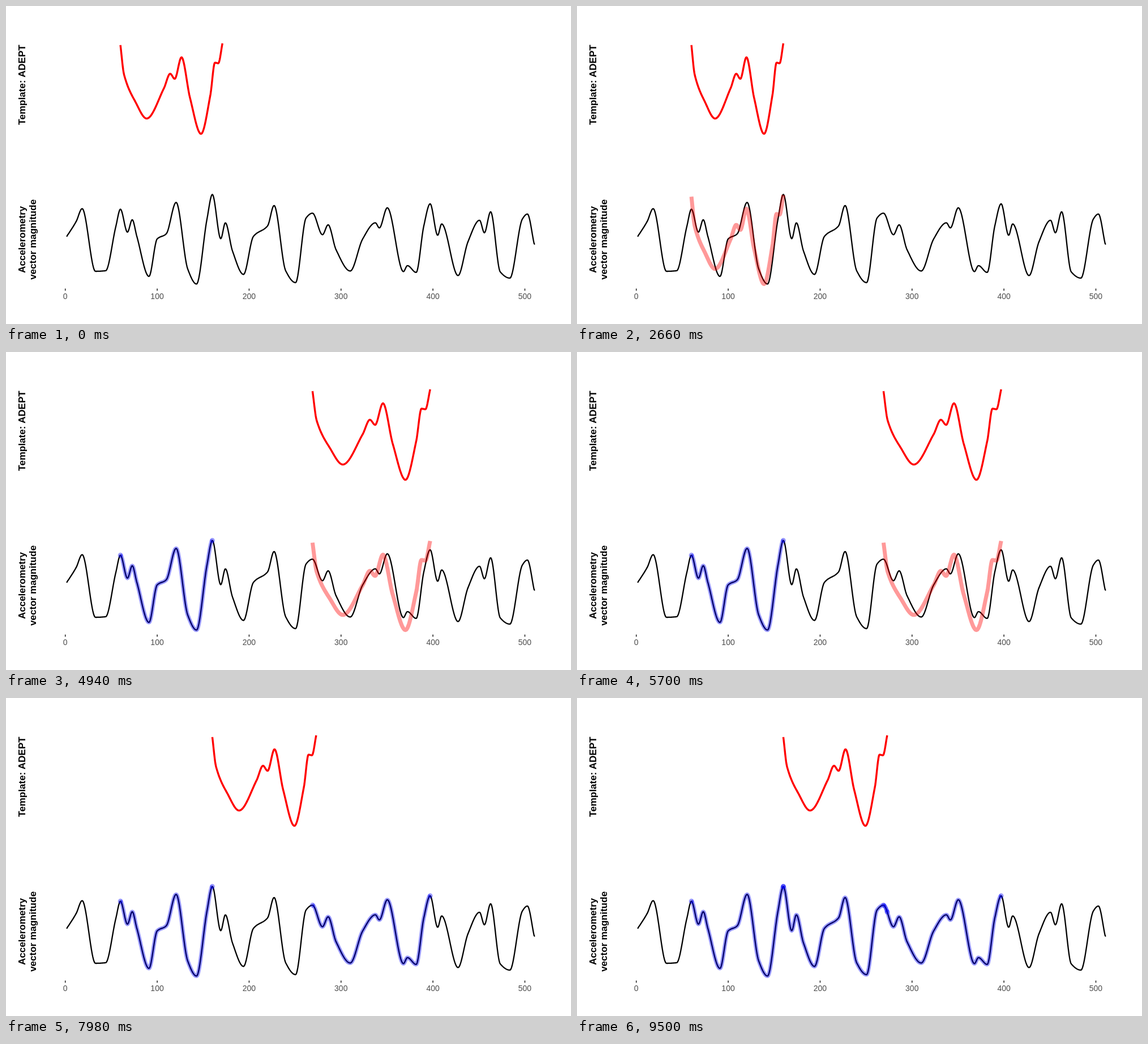
An HTML page with a canvas that plays this animation: 998 px wide and 561 px high, repeating every 9.88 s.

```html
<!DOCTYPE html>
<html lang="en">
<head>
<meta charset="utf-8">
<title>Template matching</title>
<style>
  html, body { margin: 0; width: 100%; height: 100%; overflow: hidden; background: #fff; }
  canvas { display: block; }
</style>
</head>
<body>
<canvas id="stage" width="998" height="561"></canvas>
<script>
const ctx = document.getElementById('stage').getContext('2d');
const STEP_MS = 380, STEPS = 26;
const BASE_LENGTH = 111;   // unscaled template length, in samples
const MATCHES = [
  { from: 60, to: 160, firstStep: 0 },
  { from: 269, to: 397, firstStep: 8 },
  { from: 160, to: 273, firstStep: 17 },
];
const px = sample => 104.7 + 1.6235 * sample;

// Monotone cubic interpolation through [x, y, x, y, ...]
function spline(flat) {
  const xs = flat.filter((_, i) => i % 2 === 0), ys = flat.filter((_, i) => i % 2);
  const last = xs.length - 1;
  const slopes = xs.slice(1).map((x, i) => (ys[i + 1] - ys[i]) / (x - xs[i]));
  const tangents = xs.map((_, i) => {
    if (i === 0) return slopes[0];
    if (i === last) return slopes[last - 1];
    const a = slopes[i - 1], b = slopes[i];
    return a * b <= 0 ? 0 : 2 * a * b / (a + b);
  });
  return x => {
    let i = 0;
    while (i < last - 1 && x > xs[i + 1]) i++;
    const h = xs[i + 1] - xs[i], t = Math.min(1, Math.max(0, (x - xs[i]) / h)), s = 1 - t;
    return s * s * ((1 + 2 * t) * ys[i] + t * h * tangents[i])
         + t * t * ((3 - 2 * t) * ys[i + 1] - s * h * tangents[i + 1]);
  };
}

const signal = spline([
  107, 407, 124, 380, 134.5, 357.5, 158, 468, 176, 467, 194, 389, 202.1, 358.5, 214.5, 399,
  223, 377, 231, 406, 252.5, 477, 267, 411, 283, 402, 300.5, 346.5, 321, 464, 336.5, 490.5,
  355, 376, 364.5, 332.5, 379.3, 410.5, 387.5, 382.5, 400, 432, 419.5, 473.5, 437, 406.5,
  462, 388, 473.5, 352, 494, 467, 511.5, 488, 530, 374, 541.4, 365.5, 559, 403.5, 569, 386,
  583, 430, 608, 467.5, 630, 411, 652.5, 382.5, 659.5, 391.5, 673.5, 356, 702, 468.5,
  709, 458, 724.5, 470, 738, 388, 749.2, 349, 762.5, 404.5, 769.5, 384.5, 798.5, 475.5,
  816, 416, 836.5, 378, 845, 400, 856, 363, 873, 469, 890, 480, 912, 376, 921, 367, 933, 420,
]);

const template = spline([
  202, 68, 208.5, 121, 228, 168, 248.5, 198.5, 279, 145, 290, 119.5, 298, 128.5, 310, 90.5,
  325, 162, 344.5, 225.5, 361, 157, 369, 100, 375, 101, 382.5, 65,
]);

function strokeCurve(from, to, yAt, color, width) {
  ctx.beginPath();
  const count = (to - from) * 2;
  for (let i = 0; i <= count; i++) {
    const x = px(from + i / 2);
    ctx.lineTo(x, yAt(x, i / count));
  }
  ctx.strokeStyle = color;
  ctx.lineWidth = width;
  ctx.stroke();
}

function drawTemplate(from, to, color, width, place = y => y) {
  const start = px(60), span = px(60 + BASE_LENGTH) - start;
  strokeCurve(from, to, (x, u) => place(template(start + u * span)), color, width);
}

function drawArrow(tail, tip) {
  const y = 56.2, x = px(tip), back = x - Math.sign(tip - tail) * 12;
  ctx.strokeStyle = ctx.fillStyle = 'rgba(255,0,0,.88)';
  ctx.lineWidth = 6.4;
  ctx.beginPath();
  ctx.moveTo(px(tail), y);
  ctx.lineTo(x, y);
  ctx.stroke();
  ctx.beginPath();
  ctx.moveTo(back, y - 7);
  ctx.lineTo(x, y);
  ctx.lineTo(back, y + 7);
  ctx.closePath();
  ctx.fill();
  ctx.stroke();
}

function drawArrows({ from, to }) {
  const end = from + BASE_LENGTH, shrinking = to < end;
  for (const [near, far] of [[from, from - 30], [end, end + 30]])
    shrinking ? drawArrow(far, near) : drawArrow(near, far);
}

function drawFound({ from, to }) {
  strokeCurve(from, to, signal, 'rgba(0,0,255,.4)', 7);
  ctx.fillStyle = 'rgba(0,0,255,.4)';
  for (const sample of [from, to]) {
    ctx.beginPath();
    ctx.arc(px(sample), signal(px(sample)), 4.4, 0, 2 * Math.PI);
    ctx.fill();
  }
}

function sideLabel(text, baseline, middle) {
  ctx.save();
  ctx.translate(baseline, middle);
  ctx.rotate(-Math.PI / 2);
  ctx.fillText(text, 0, 0);
  ctx.restore();
}

function drawChart() {
  ctx.textAlign = 'center';
  ctx.fillStyle = '#000';
  ctx.font = 'bold 17px "Liberation Sans", Arial, sans-serif';
  sideLabel('Template: ADEPT', 34.3, 139);
  sideLabel('Accelerometry', 34.3, 412);
  sideLabel('vector magnitude', 53, 412);

  ctx.font = '14px "Liberation Sans", Arial, sans-serif';
  for (let value = 0; value <= 500; value += 100) {
    ctx.fillStyle = '#333';
    ctx.fillRect(px(value) - 0.8, 498.5, 1.7, 3.8);
    ctx.fillStyle = '#4d4d4d';
    ctx.fillText(value, px(value), 517);
  }
  strokeCurve(1.5, 511, signal, '#000', 2.3);
}

function draw(step) {
  const current = step < 9 ? 0 : step < 17 ? 1 : 2;
  const match = MATCHES[current], phase = step - match.firstStep;
  ctx.fillStyle = '#fff';
  ctx.fillRect(0, 0, 998, 561);
  drawChart();
  MATCHES.slice(0, current + (phase === 8)).forEach(drawFound);

  const end = phase === 0 ? match.from + BASE_LENGTH : match.to;
  drawTemplate(match.from, end, '#f00', 3.4);
  // Arrows blink twice, then the overlay does
  if (phase === 1 || phase === 3) drawArrows(match);
  if (phase === 5 || phase === 7)
    drawTemplate(match.from, end, 'rgba(255,0,0,.4)', 7, y => 332.5 + (y - 65) * 0.984);
}

function tick() {
  draw(Math.floor(performance.now() / STEP_MS) % STEPS);
  requestAnimationFrame(tick);
}
ctx.lineJoin = 'round';
tick();
</script>
</body>
</html>
```
